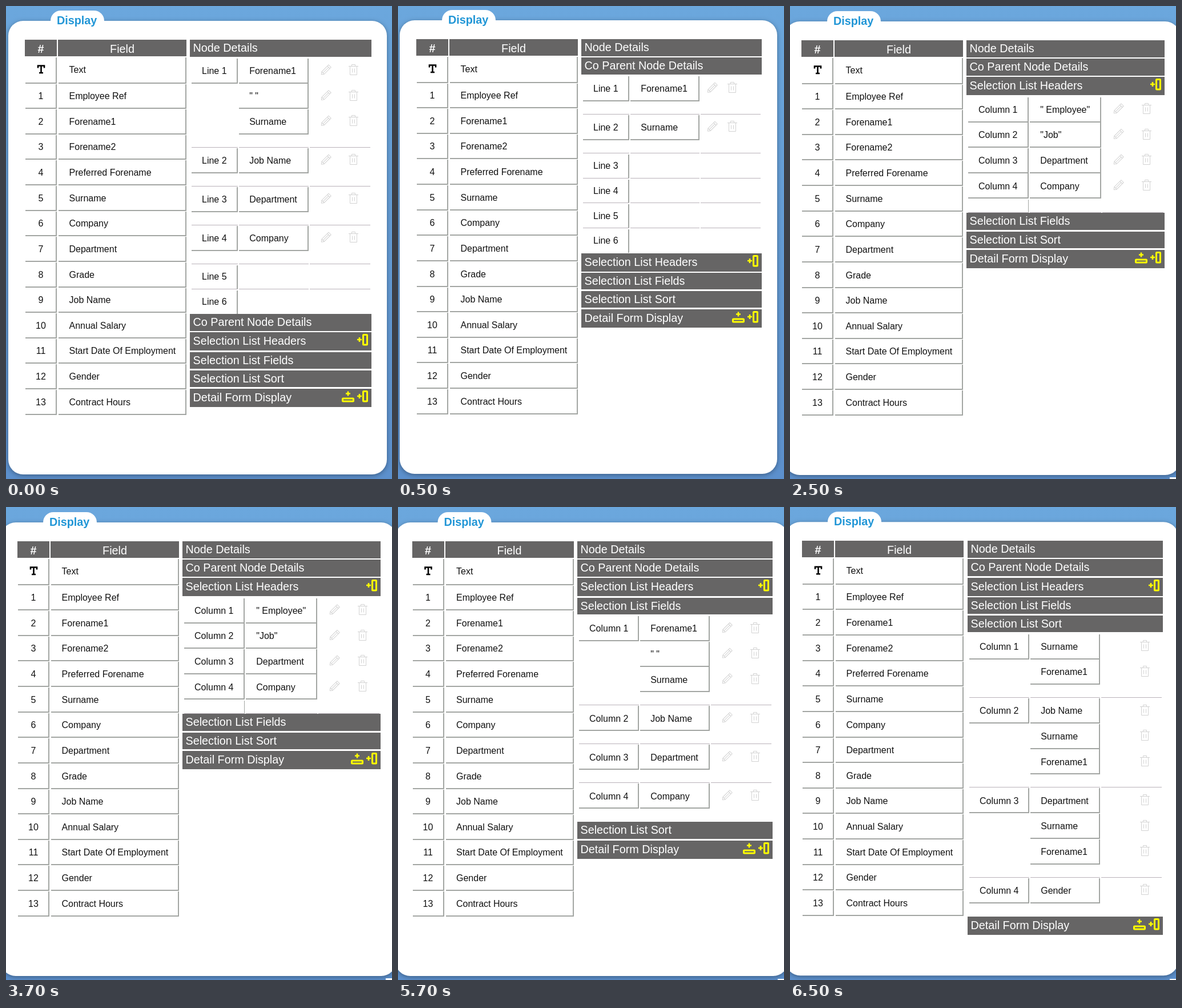
Animation, 676 px wide and 828 px high, one loop 8 s. Source, as an HTML page with a canvas:

```html
<!DOCTYPE html>
<html lang="en">
<head>
<meta charset="utf-8">
<title>Display settings</title>
<style>
html, body { margin: 0; width: 100%; height: 100%; overflow: hidden; }
canvas { display: block; }
</style>
</head>
<body>
<canvas id="stage" width="676" height="828"></canvas>
<script>
const ctx = document.getElementById('stage').getContext('2d');
const W = 676, H = 828, LOOP = 8000;
const SANS = '"Liberation Sans", Arial, sans-serif';
const BAR = '#666565', EDGE = '#a3a6a3', RULE = '#b9b2b9', FAINT = '#d3d3d3', YELLOW = '#ffff00';
const HEADING = 19.8;

const FIELDS = ['Text', 'Employee Ref', 'Forename1', 'Forename2', 'Preferred Forename', 'Surname',
  'Company', 'Department', 'Grade', 'Job Name', 'Annual Salary', 'Start Date Of Employment',
  'Gender', 'Contract Hours'];
const SECTIONS = ['Node Details', 'Co Parent Node Details', 'Selection List Headers',
  'Selection List Fields', 'Selection List Sort', 'Detail Form Display'];

// x, y: table corner; left, right: section bars; a, b: right edges of the two cell columns
const SCENES = [
  { start: 0, x: 33, y: 59, left: 322, right: 640, a: 406, b: 530, pencil: 560, bin: 609,
    open: 0, label: 'Line',
    groups: [['Forename1', '" "', 'Surname'], ['Job Name'], ['Department'], ['Company'], [], []] },
  { start: 500, x: 32, y: 58, left: 321, right: 637, a: 405, b: 528, pencil: 550, bin: 586,
    open: 1, label: 'Line',
    groups: [['Forename1'], ['Surname'], [], [], [], []] },
  { start: 2500, x: 20, y: 60, left: 309, right: 656, a: 418, b: 545, pencil: 575, bin: 625,
    open: 2, label: 'Column', tight: true, notch: 825,
    groups: [['" Employee"'], ['"Job"'], ['Department'], ['Company']] },
  { start: 4500, x: 24.5, y: 60, left: 314, right: 656, a: 422, b: 546, pencil: 576, bin: 626,
    open: 3, label: 'Column', notch: 826,
    groups: [['Forename1', '" "', 'Surname'], ['Job Name'], ['Department'], ['Company']] },
  { start: 6500, x: 21, y: 59.2, left: 311, right: 653, a: 419, b: 543, bin: 622,
    open: 4, label: 'Column', notch: 826,
    groups: [['Surname', 'Forename1'], ['Job Name', 'Surname', 'Forename1'],
      ['Department', 'Surname', 'Forename1'], ['Gender']] }
];

function rect(x, y, w, h, color) {
  ctx.fillStyle = color;
  ctx.fillRect(Math.round(x), Math.round(y), Math.round(w), Math.round(h));
}

function text(str, x, y, size = 16, color = '#111', align = 'left', weight = '') {
  ctx.font = `${weight} ${size}px ${SANS}`;
  ctx.fillStyle = color;
  ctx.textAlign = align;
  ctx.fillText(str, x, Math.round(y));
}

function lines(color, width, ...paths) {
  ctx.strokeStyle = color;
  ctx.lineWidth = width;
  ctx.beginPath();
  for (const p of paths) {
    ctx.moveTo(p[0], p[1]);
    for (let i = 2; i < p.length; i += 2) ctx.lineTo(p[i], p[i + 1]);
  }
  ctx.stroke();
}

// Cell with raised right and bottom edges
function cell(x0, x1, top, bottom) {
  const t = Math.round(top) + 1, b = Math.round(bottom);
  rect(x1 - 2, t, 2, b + 1 - t, EDGE);
  rect(x0, b - 1, x1 - x0, 2, EDGE);
}

function at(x, y, draw) {
  ctx.save();
  ctx.translate(x, y);
  draw();
  ctx.restore();
}

function pencil(x, y) {
  at(x, y, () => {
    ctx.rotate(-Math.PI / 4);
    lines(FAINT, 1, [-11, 0, -7, -3, 10, -3, 10, 3, -7, 3, -11, 0],
      [-7, -3, -7, 3], [7, -3, 7, 3], [-7, 0, 7, 0]);
  });
}

function bin(x, y) {
  at(Math.round(x) - .5, Math.round(y) - .5, () => {
    lines(FAINT, 1, [-8.5, -6, 8.5, -6], [-3, -6, -3, -9, 3, -9, 3, -6],
      [-6, -6, -6, 9, 6, 9, 6, -6], [-2, -2, -2, 5], [2, -2, 2, 5]);
  });
}

function plus(x, y) {
  lines(YELLOW, 2.6, [x - 4, y, x + 4, y], [x, y - 4, x, y + 4]);
}

function slot(x, y, w, h) {
  ctx.strokeStyle = YELLOW;
  ctx.lineWidth = 3;
  ctx.beginPath();
  ctx.roundRect(x, y, w, h, 1);
  ctx.stroke();
}

function addColumn(right, top) {
  plus(right - 21, top + 13);
  slot(right - 14.5, top + 4.5, 7, 17.5);
}

function addRow(right, top) {
  plus(right - 41, top + 8.5);
  slot(right - 50.5, top + 17, 19, 5);
}

function backdrop(s) {
  const g = ctx.createLinearGradient(0, 0, 0, H);
  g.addColorStop(0, '#6ba7dd');
  g.addColorStop(1, '#5c90cd');
  ctx.fillStyle = g;
  ctx.fillRect(0, 0, W, H);
  const x = s.x - 29, y = s.y - 33;
  ctx.save();
  ctx.shadowColor = 'rgba(0, 0, 0, .35)';
  ctx.shadowBlur = 8;
  ctx.shadowOffsetY = 2;
  ctx.fillStyle = '#fff';
  ctx.beginPath();
  ctx.roundRect(x, y, s.right + 27 - x, 794, 26);
  ctx.fill();
  ctx.restore();
  ctx.fillStyle = '#fff';
  ctx.beginPath();
  ctx.roundRect(s.x + 45, s.y - 51, 94, 30, [18, 18, 0, 0]);
  ctx.fill();
  text('Display', s.x + 56, s.y - 27, HEADING, '#2196d6', 'left', 'bold');
  if (s.notch) rect(665, s.notch, 11, H - s.notch, '#fff');
}

function fieldTable({ x, y }) {
  rect(x, y, 56, 29, BAR);
  rect(x + 58, y, 225, 29, BAR);
  text('#', x + 28, y + 23, HEADING, '#fff', 'center', 'bold');
  text('Field', x + 170.5, y + 23, HEADING, '#fff', 'center');
  FIELDS.forEach((name, i) => {
    const bottom = y + 75.6 + 44.62 * i;
    const top = i ? bottom - 43.6 : y + 30;
    cell(x + 1, x + 56, top, bottom);
    cell(x + 59, x + 283, top, bottom);
    const base = bottom - (i ? 16 : 17.6);
    text(name, x + 77.5, base);
    if (i) text(i, x + 28, base, 16, '#111', 'center');
  });
  at(x + 28.5, y + 44, () => lines('#000', 2.6, [-5.5, 5.5, -5.5, 1.5, 5.5, 1.5, 5.5, 5.5],
    [0, 1, 0, 14], [-3.5, 14, 3.5, 14]));
}

function rule(s, y) {
  rect(s.left + 3, y, s.a - s.left - 3, 1, RULE);
  rect(s.a + 2, y, s.b - s.a - 2, 1, RULE);
  rect(s.b + 2, y, s.right - s.b - 4, 1, RULE);
}

// Draws the opened section and returns the y where the next bar begins
function groupRows(s, y) {
  s.groups.forEach((values, n) => {
    const last = n === s.groups.length - 1;
    const caption = `${s.label} ${n + 1}`;
    const labelX = s.left + 21;
    if (!values.length) {
      text(caption, labelX, y + 27.5);
      rect(s.a - 2, y + 2, 2, 41, EDGE);
      y += 43.68;
      if (!last) rule(s, y - 1);
      return;
    }
    values.forEach((value, i) => {
      const bottom = y + 44, base = bottom - 15.8;
      if (!i) {
        cell(s.left + 3, s.a, y, bottom);
        text(caption, labelX, base);
      }
      cell(s.a + 2, s.b, y, bottom);
      text(value, s.a + 20.2, base);
      if (s.pencil) pencil(s.pencil, bottom - 22.5);
      bin(s.bin, bottom - 22.5);
      y = bottom + .6;
    });
    if (s.tight && !last) return;
    if (s.tight) rect(s.a - 1, y + 2, 1, 23, EDGE);
    y += s.tight ? 25.4 : 23.4;
    if (!last || s.tight) rule(s, y - 1);
  });
  return y;
}

function sections(s) {
  let y = s.y;
  SECTIONS.forEach((name, i) => {
    const icons = i === 2 || i === 5;
    const h = icons ? 32 : 29.5, top = Math.round(y);
    rect(s.left, top, s.right - s.left, Math.round(y + h) - top, BAR);
    text(name, s.left + 5.5, top + (icons ? 22 : 21), HEADING, '#fff');
    if (icons) addColumn(s.right, top);
    if (i === 5) addRow(s.right, top);
    y = i === s.open ? groupRows(s, y + h + 2.2) : y + h + (icons ? 2.15 : 2.7);
  });
}

function frame() {
  const t = performance.now() % LOOP;
  const s = SCENES.filter(scene => scene.start <= t).pop();
  backdrop(s);
  fieldTable(s);
  sections(s);
  requestAnimationFrame(frame);
}
frame();
</script>
</body>
</html>
```
